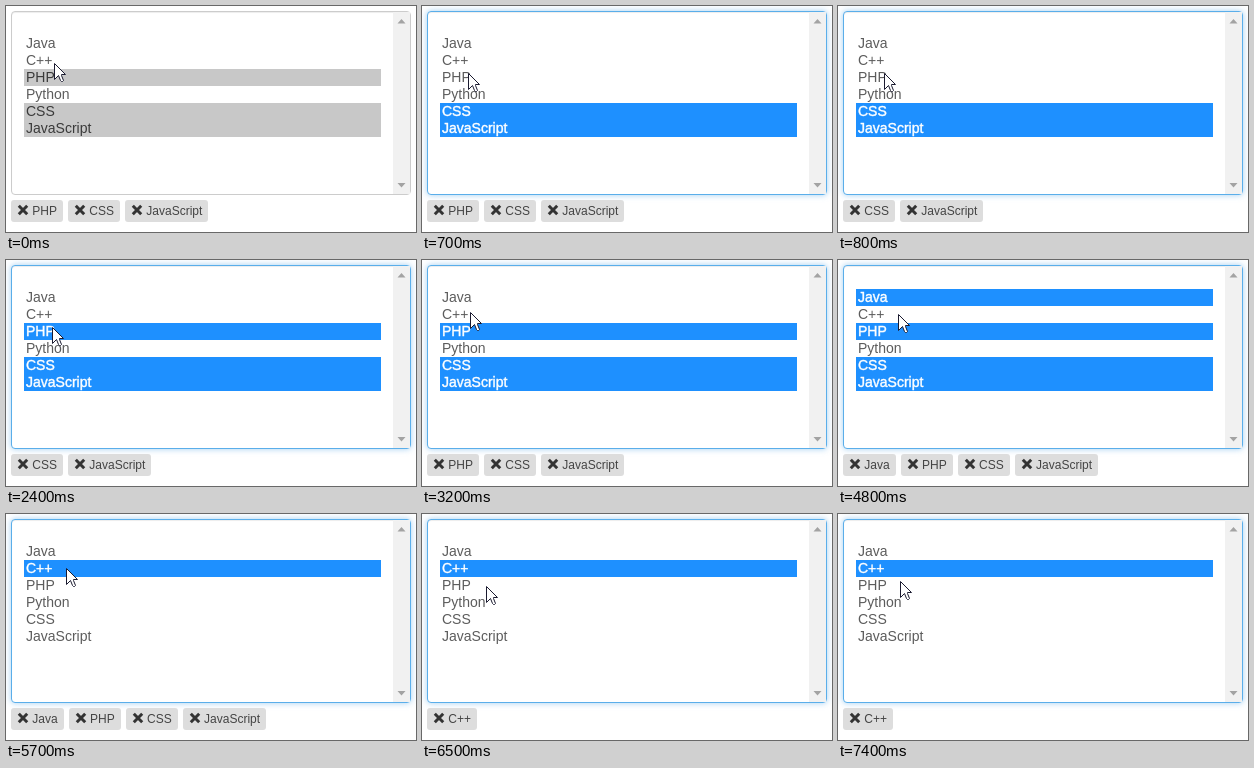
An HTML page that plays this animation: 410 px wide and 226 px high, repeating every 8000 ms.

```html
<!DOCTYPE html>
<html lang="en">
<head>
<meta charset="utf-8">
<title>Multiple select with tags</title>
<style>
  html, body { margin: 0; width: 100%; height: 100%; overflow: hidden; background: #fff; }
  body { position: relative; font-family: "Liberation Sans", Arial, sans-serif; }
  #box {
    position: absolute; left: 5px; top: 5px; width: 400px; height: 184px;
    box-sizing: border-box; border: 1px solid #ccc; border-radius: 4px;
    background: #fff; box-shadow: inset 0 1px 1px rgba(0, 0, 0, .075);
  }
  #box.focus {
    border-color: #5aaeea;
    box-shadow: inset 0 1px 1px rgba(0, 0, 0, .075), 0 0 6px rgba(102, 175, 233, .6);
  }
  #list { position: absolute; left: 12px; top: 23px; width: 357px; }
  .row {
    height: 17px; padding-left: 2px; font-size: 14px; line-height: 16px; color: #5c5c5c;
  }
  .row.on { background: #c8c8c8; color: #3a3a3a; }
  .focus .row.on { background: #1e90ff; color: #fff; -webkit-text-stroke: .4px #fff; }
  #bar { position: absolute; right: 0; top: 0; width: 17px; height: 182px; background: #f1f1f1; }
  #bar path { fill: #a3a3a3; }
  #tags { position: absolute; left: 5px; top: 194px; display: flex; gap: 5px; }
  .tag {
    display: flex; height: 22px; padding: 0 6px; border-radius: 3px;
    background: #ddd; color: #444; font-size: 12px; line-height: 22px; white-space: nowrap;
  }
  .tag svg { width: 12px; height: 12px; margin: 4px 3.33px 0 0; }
  .tag path { stroke: #333; stroke-width: 3; }
  #cursor { position: absolute; left: 0; top: 0; width: 13px; height: 20px; }
</style>
</head>
<body>
<div id="box">
  <div id="list"></div>
  <svg id="bar" viewBox="0 0 17 182">
    <path d="M4.5 11.5L8.5 7L12.5 11.5ZM4.5 171L8.5 175.5L12.5 171Z"/>
  </svg>
</div>
<div id="tags"></div>
<svg id="cursor" viewBox="0 0 13 20">
  <path d="M.5 .5V16.5L4.5 12.5L6.5 17.5L7.5 18.5H8.5L9.5 17.5L7.5 12.5V11.5H11.5Z"
    fill="#fff" stroke="#1b1b30" stroke-linejoin="round"/>
</svg>
<script>
const LOOP = 8000, STEP = 100;
const names = ["Java", "C++", "PHP", "Python", "CSS", "JavaScript"];
const initial = ["PHP", "CSS", "JavaScript"];
const home = { x: 48, y: 57 };

// The list reacts when the button goes down, the tags when it comes up.
const clicks = [
  { name: "PHP", down: 700, up: 800 },
  { name: "PHP", down: 2400, up: 2500 },
  { name: "Java", down: 3800, up: 3800 },
  { name: "C++", down: 5700, up: 5800, only: true }
];

const glides = [
  { from: 100, to: 300, x: 46, y: 67 },
  { from: 3100, to: 3400, x: 50, y: 37 },
  { from: 4100, to: 4200, x: 60, y: 48 },
  { from: 4600, to: 4800, x: 60, y: 54 },
  { from: 6200, to: 6900, x: 68, y: 90 },
  { from: 7100, to: 7400, x: 62, y: 67 }
];

const $ = id => document.getElementById(id);
const box = $("box"), list = $("list"), tags = $("tags"), cursor = $("cursor");

const rows = names.map(name => {
  const row = document.createElement("div");
  row.className = "row";
  row.textContent = name;
  list.append(row);
  return row;
});

// Applies every click whose given phase ("down" or "up") has passed.
function selection(t, phase) {
  let chosen = new Set(initial);
  for (const click of clicks) {
    if (t < click[phase]) break;
    if (click.only) chosen = new Set([click.name]);
    else if (!chosen.delete(click.name)) chosen.add(click.name);
  }
  return names.filter(name => chosen.has(name));
}

function pointer(t) {
  let { x, y } = home;
  for (const g of glides) {
    if (t < g.from) break;
    const steps = (g.to - g.from) / STEP + 1;
    const p = Math.min(1, (Math.floor((t - g.from) / STEP) + 1) / steps);
    x += (g.x - x) * p;
    y += (g.y - y) * p;
  }
  return [Math.round(x), Math.round(y)];
}

const tagHtml = name => `<span class="tag"><svg viewBox="0 0 12 12">
  <path d="M1.8 1.8L10.2 10.2M10.2 1.8L1.8 10.2"/></svg>${name}</span>`;

let shownTags = "";
function draw() {
  const t = performance.now() % LOOP;
  const selected = selection(t, "down");
  rows.forEach(row => row.classList.toggle("on", selected.includes(row.textContent)));
  box.classList.toggle("focus", t >= clicks[0].down);

  const html = selection(t, "up").map(tagHtml).join("");
  if (html !== shownTags) tags.innerHTML = shownTags = html;

  const [x, y] = pointer(t);
  cursor.style.transform = `translate(${x}px, ${y}px)`;
  requestAnimationFrame(draw);
}
draw();
</script>
</body>
</html>
```
